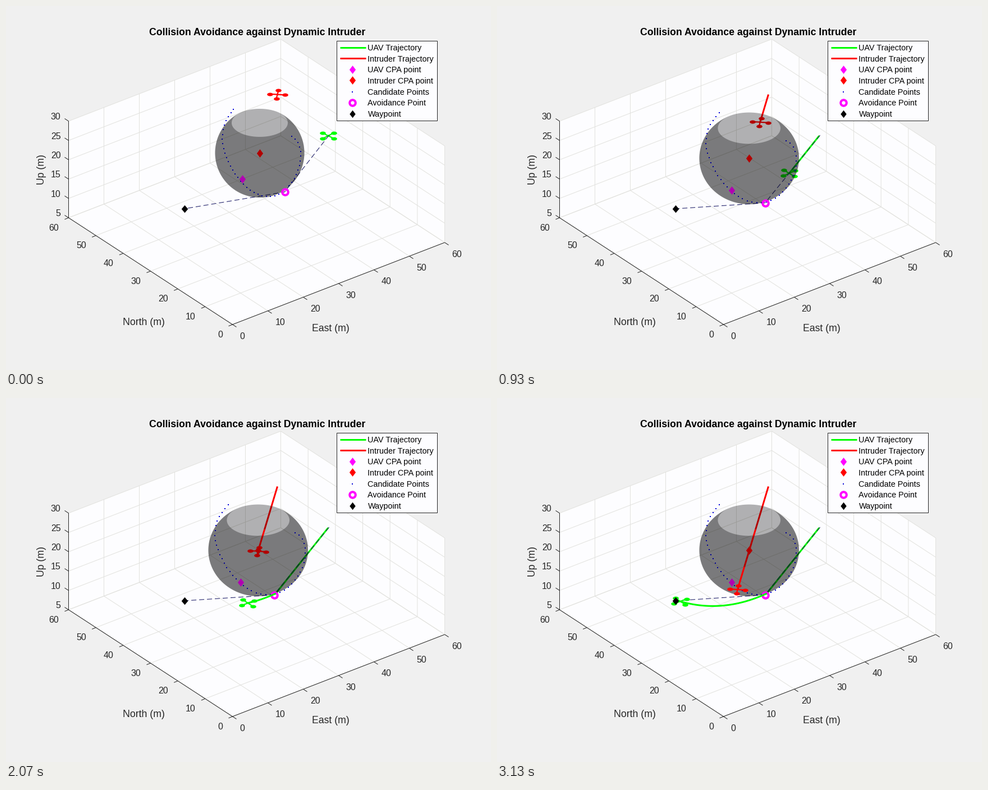
These frames come from a looping animation (864x648 px, 3.16 s). A matplotlib script:

```python
import numpy as np
import matplotlib.pyplot as plt
from matplotlib.animation import FuncAnimation
from matplotlib.patches import Polygon, Rectangle

W, H = 864, 648
LOOP, TICK, STEP = 3160, 20, 100 / 3      # ms
LAST, TURN = 94, 47                       # simulation steps
INK, PAPER = "#262626", "#fdfdff"
GREEN, RED, MAGENTA, BLUE = "#00ff00", "#ff0000", "#ff00ff", "#0000d8"
BACK, MID, TOP = 2, 4, 6                  # behind, inside, in front of the sphere

plt.rcParams["font.family"] = "Liberation Sans"
fig = plt.figure(figsize=(W / 72, H / 72), dpi=72, facecolor="#f0f0f0")
ax = fig.add_axes([0, 0, 1, 1])
ax.set_xlim(0.5, W + 0.5)
ax.set_ylim(H, 0)
ax.axis("off")


def project(e, n, u=5.0):
    """East, north, up in metres to stage pixels."""
    return np.array([404 + 6.3 * e - 4.867 * n,
                     567 - 2.433 * e - 3.167 * n - 6.88 * (u - 5)])


def line(pts, color, lw=1.0, z=1, **kw):
    xy = np.reshape(pts, (-1, 2))
    return ax.plot(xy[:, 0], xy[:, 1], color=color, lw=lw, zorder=z,
                   solid_capstyle="butt", **kw)[0]


def label(x, y, s, size, ha="center", **kw):
    """Text whose capitals are centred on y."""
    ax.text(x, y + 0.36 * size, s, fontsize=size, ha=ha, va="baseline", zorder=12, **kw)


def marker(x, y, shape, color, z=TOP):
    shape = np.array(shape, float)
    return ax.plot([x], [y], ls="", marker=shape, ms=2 * np.abs(shape).max(),
                   color=color, mew=0, zorder=z)[0]


def diamond(x, y, color, z=TOP, hw=5.6, hh=7.4):
    return marker(x, y, [(0, hh), (hw, 0), (0, -hh), (-hw, 0), (0, hh)], color, z)


def ring(x, y, z=TOP):
    return ax.plot([x], [y], "o", ms=10.5, mfc="none", mec=MAGENTA, mew=4, zorder=z)[0]


def dotted(x, y, z):
    return ax.plot(x, y, "s", ms=2.7, color=BLUE, mew=0, zorder=z)[0]


# Axes box, grid, ticks
box = [(0, 60, 5), (0, 60, 30), (60, 60, 30), (60, 0, 30), (60, 0, 5), (0, 0, 5)]
ax.add_patch(Polygon([project(*c) for c in box], fc=PAPER, ec="none", zorder=0))


def grid(*corners):
    line([project(*c) for c in corners], "#e2e2de")


def tick(p, d, off, ha, s):
    line([p, p + d], INK)
    label(p[0] + off[0], p[1] + off[1], s, 16, ha, color=INK)


for v in range(0, 61, 10):
    grid((v, 0, 5), (v, 60, 5), (v, 60, 30))
    grid((0, v, 5), (60, v, 5), (60, v, 30))
    tick(project(v, 0), (7, 4.5), (13, 20), "left", str(v))
    tick(project(0, v), (-7, 2.8), (-17, 17), "right", str(v))
for v in range(5, 31, 5):
    grid((0, 60, v), (60, 60, v), (60, 0, v))
    tick(project(0, 60, v), (-7, -4.5), (-14, -8.5), "right", str(v))
line([project(60, 0), project(0, 0), project(0, 60), project(0, 60, 30)], INK, z=1.5)

label(448, 46, "Collision Avoidance against Dynamic Intruder", 17.6, weight="bold")
label(579, 573, "East (m)", 17.6, color=INK)
label(246, 562, "North (m)", 17.6, color=INK)
ax.text(69, 290.5, "Up (m)", fontsize=17.6, color=INK, ha="center", va="baseline",
        rotation=90, rotation_mode="anchor")

# Legend
ax.add_patch(Rectangle((589, 61.5), 179, 142, fc=PAPER, ec=INK, lw=1, zorder=10))
names = ["UAV Trajectory", "Intruder Trajectory", "UAV CPA point",
         "Intruder CPA point", "Candidate Points", "Avoidance Point", "Waypoint"]
rows = 74 + 19.65 * np.arange(7)
for y, s in zip(rows, names):
    label(645, y, s, 14.4, "left")
for y, color in zip(rows, (GREEN, RED)):
    line([(595, y - 0.5), (641, y - 0.5)], color, 3, 11)
for y, color in zip(rows[2:], (MAGENTA, RED)):
    diamond(617.5, y - 0.5, color, 11)
dotted([617.5], [rows[4]], 11)
ring(617.5, rows[5], 11)
diamond(617.5, rows[6], "black", 11, 5.2, 6.8)


def sphere(cx, cy, rh, rz=79.5, cut=61.8, el=np.radians(30)):
    """Outlines of the whole cut ellipsoid and of its near wall."""
    b = np.hypot(rz * np.cos(el), rh * np.sin(el))
    t0 = np.arcsin(cut * b / (rz * rz * np.cos(el)))
    rc = rh * np.sqrt(1 - (cut / rz) ** 2)
    f0 = np.arccos(rh * np.cos(t0) / rc)
    t = np.linspace(t0, -np.pi - t0, 120)
    body = np.c_[cx + rh * np.cos(t), cy - b * np.sin(t)]

    def rim(end):
        f = np.linspace(np.pi - f0, end, 60)
        return np.c_[cx + rc * np.cos(f),
                     cy - cut * np.cos(el) - rc * np.sin(el) * np.sin(f)]

    return np.vstack([body, rim(f0)]), np.vstack([body, rim(2 * np.pi + f0)])


def arc_length(p):
    d = np.r_[0, np.cumsum(np.hypot(*np.diff(p, axis=0).T))]
    return d / d[-1]


def even_dots(keys, n=43):
    """Evenly spaced dots on a smooth curve through the key points."""
    keys = np.array(keys, float)
    fit = np.polyfit(arc_length(keys), keys, len(keys) - 1)
    u = np.linspace(0, 1, 400)
    p = np.c_[np.polyval(fit[:, 0], u), np.polyval(fit[:, 1], u)]
    return np.c_[[np.interp(np.linspace(0, 1, n), arc_length(p), c) for c in p.T]].T


arc = even_dots([(396, 190), (373, 237), (397, 306), (470, 350.5), (521.5, 316), (515, 240)])
first_arc = (386, 184) + (arc - (373, 190)) * (0.868, 0.966)


def scene(hit, radius, own, avoid, dots):
    return dict(ball=sphere(*hit, radius), hit=hit, own=own, avoid=avoid, dots=dots)


# The prediction is revised once, right after the first step
START, GOAL = (576, 230), (318, 361)
scenes = [scene((452.5, 261.5), 79.5, (421.5, 308), (497, 331), first_arc),
          scene((449.7, 271), 88.75, (418.3, 328), (478, 350.5), arc)]

walls = [ax.add_patch(Polygon([(0, 0), (1, 0), (1, 1)], fc="black", ec="none",
                              alpha=0.3, zorder=z)) for z in (3, 5)]
plan = line([START, GOAL], "#10105e", 1, MID, dashes=(9, 5))
dots = dotted([], [], MID + 0.2)
hit = diamond(0, 0, RED, MID + 0.3)
own = diamond(0, 0, MAGENTA, MID + 0.3)
avoid = ring(0, 0)
diamond(*GOAL, "black", TOP + 2, 5.8, 6.8)


def bezier(u, *p):
    """Line or quadratic curve through two or three control points."""
    p = np.array(p, float)
    u = u[:, None]
    if len(p) == 2:
        return p[0] + u * (p[1] - p[0])
    return (1 - u) ** 2 * p[0] + 2 * u * (1 - u) * p[1] + u * u * p[2]


def gather(u, a):
    """Slow start: speed grows steadily from a to 2 - a."""
    return u * (a + (1 - a) * u)


# Flight paths, two samples per step
fine = np.arange(2 * LAST + 1) / 2
corner = (481, 348)
dive, glide = fine[fine < TURN] / TURN, (fine[fine >= TURN] - TURN) / (LAST - TURN)
uav_path = np.vstack([bezier(gather(dive, 0.9), (574.5, 231), corner),
                      bezier(glide, corner, (403, 384), (327, 362))])
bad_path = bezier(gather(fine / LAST, 0.86), (484, 157.5), (429, 341))
bad_y = bad_path[:, 1]
uav_parts = {BACK: fine <= TURN, TOP: fine >= TURN}
bad_parts = {BACK: bad_y <= 236, MID: (bad_y >= 234) & (bad_y <= 302), TOP: bad_y >= 300}

a = np.linspace(0, 2 * np.pi, 25)
disc = np.c_[5.3 * np.cos(a), 3 * np.sin(a)]


class Drone:
    def __init__(self, color, path, parts):
        self.path, self.parts = path, parts
        self.trails = {z: line([], color, 3, z + 0.4) for z in parts}
        self.arms = line([], color, 2.2)
        self.rotors = marker(0, 0, disc, color)

    def show(self, k, yaw):
        i = 2 * k
        for layer, part in self.parts.items():
            xy = self.path[:i + 1][part[:i + 1]]
            self.trails[layer].set_data(xy[:, 0], xy[:, 1])
        ang = np.radians(yaw + 90 * np.arange(4))
        tips = (project(1.77 * np.cos(ang), 1.77 * np.sin(ang)).T
                - project(0, 0) + self.path[i])
        gap = [np.nan, np.nan]
        cross = np.array([tips[0], tips[2], gap, tips[1], tips[3]])
        self.arms.set_data(cross[:, 0], cross[:, 1])
        self.rotors.set_data(tips[:, 0], tips[:, 1])
        depth = max(z for z, part in self.parts.items() if part[i])
        for art in (self.arms, self.rotors):
            art.set_zorder(depth + 0.5)


uav = Drone(GREEN, uav_path, uav_parts)
intruder = Drone(RED, bad_path, bad_parts)


def draw(i):
    k = min(int((TICK * (i + 0.5) + 5) / STEP), LAST)
    s = scenes[k > 0]
    for wall, xy in zip(walls, s["ball"]):
        wall.set_xy(xy)
    for art, key in ((hit, "hit"), (own, "own"), (avoid, "avoid")):
        art.set_data([s[key][0]], [s[key][1]])
    dots.set_data(s["dots"][:, 0], s["dots"][:, 1])
    plan.set_data(*zip(START, s["avoid"], GOAL))
    uav.show(k, max(0, 8 - k / 5))
    intruder.show(k, 45)
    return []


anim = FuncAnimation(fig, draw, frames=LOOP // TICK, interval=TICK,
                     init_func=lambda: draw(0), repeat=True, repeat_delay=0)
plt.show()
```
